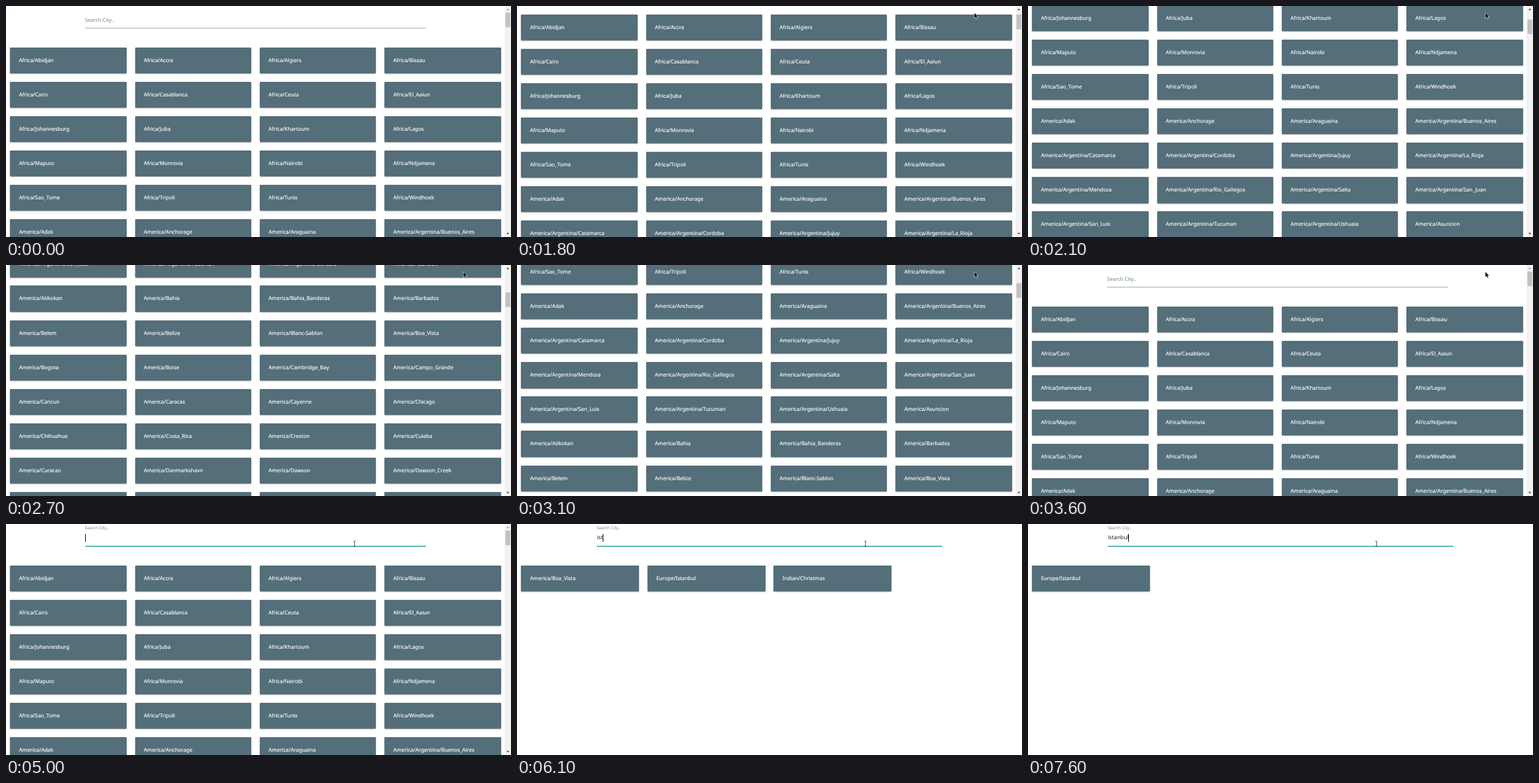
Write an HTML page that moves like this. It is 766x350 px and loops after 8 s.

```html
<!DOCTYPE html>
<html lang="en">
<head>
<meta charset="utf-8">
<title>City search</title>
<style>
html, body { margin: 0; width: 100%; height: 100%; overflow: hidden; background: #fff; }
#stage {
  position: relative; width: 766px; height: 350px; overflow: hidden; background: #fff;
  font-family: "Noto Sans", "Open Sans", sans-serif; text-rendering: geometricPrecision;
}
#page { position: absolute; left: 0; top: 0; width: 757px; }
#page.wide { width: 766px; }
#field { position: absolute; left: calc(15% + 6.3px); width: calc(70% - 12.6px); top: 0; height: 40px; }
#field * { position: absolute; left: 0; white-space: pre; }
#label { top: 11.5px; line-height: 20px; font-size: 7.8px; color: #6b8390; transform-origin: 0 50%; }
#line { top: 33px; width: 100%; height: 1px; background: #a5adb0; }
#focus { top: 33px; width: 100%; height: 1px; background: #26a69a; box-shadow: 0 1px rgba(38, 166, 154, .45); }
#text { top: 11.3px; line-height: 20px; font-size: 8.3px; color: #1c1c1c; }
#caret { top: 15px; width: 1px; height: 12px; background: #111; }
#grid {
  position: absolute; top: 62.9px; width: 100%; box-sizing: border-box; padding: 0 6.3px;
  display: grid; grid-template-columns: repeat(4, minmax(0, 1fr)); grid-auto-rows: 39.2px; gap: 12.88px 12.6px;
}
.card {
  padding-left: 13.5px; line-height: 41px; font-size: 7.92px; color: #fff; white-space: nowrap;
  -webkit-text-stroke: .15px #fff; background: #546e7a; border-radius: 1.1px;
  box-shadow: 0 1.1px 1.1px rgba(0, 0, 0, .14), 0 1.7px .6px -1.1px rgba(0, 0, 0, .12), 0 .6px 2.8px rgba(0, 0, 0, .2);
}
svg { position: absolute; left: 0; top: 0; }
</style>
</head>
<body>
<div id="stage">
  <div id="page">
    <div id="field">
      <div id="label">Search City..</div>
      <div id="line"></div>
      <div id="focus"></div>
      <div id="text"></div>
      <div id="caret"></div>
    </div>
    <div id="grid"></div>
  </div>
  <svg width="766" height="350">
    <g id="bar">
      <rect x="756.5" width="9.5" height="350" fill="#f1f1f1"/>
      <rect id="thumb" x="757.5" y="10" width="7.5" height="22" fill="#c1c1c1"/>
      <path id="up" d="M759 6.2l2.2-2.4 2.2 2.4z"/>
      <path d="M759 343.8l2.2 2.4 2.2-2.4z" fill="#505050"/>
    </g>
    <path id="arrow" d="M0 0v8.8l2-1.9 1.5 3.2 1.5-.7-1.4-3.1h2.7z" fill="#000" stroke="#fff" stroke-width=".6"/>
    <path id="beam" d="M-1.8-4h1.3l.5.5.5-.5h1.3M0-3.5v7M-1.8 4h1.3l.5-.5.5.5h1.3" fill="none" stroke="#333" stroke-width=".8"/>
  </svg>
</div>
<script>
const LOOP = 8000, TICK = 100;
const zones = {
  "Africa": "Abidjan Accra Algiers Bissau Cairo Casablanca Ceuta El_Aaiun Johannesburg Juba Khartoum Lagos " +
    "Maputo Monrovia Nairobi Ndjamena Sao_Tome Tripoli Tunis Windhoek",
  "America": "Adak Anchorage Araguaina Argentina/Buenos_Aires Argentina/Catamarca Argentina/Cordoba " +
    "Argentina/Jujuy Argentina/La_Rioja Argentina/Mendoza Argentina/Rio_Gallegos Argentina/Salta " +
    "Argentina/San_Juan Argentina/San_Luis Argentina/Tucuman Argentina/Ushuaia Asuncion Atikokan Bahia " +
    "Bahia_Banderas Barbados Belem Belize Blanc-Sablon Boa_Vista Bogota Boise Cambridge_Bay Campo_Grande " +
    "Cancun Caracas Cayenne Chicago Chihuahua Costa_Rica Creston Cuiaba Curacao Danmarkshavn Dawson " +
    "Dawson_Creek Denver Detroit Edmonton Eirunepe Indiana/Indianapolis Kentucky/Louisville",
  "Antarctica": "Davis",
  "Asia": "Bishkek Tbilisi",
  "Australia": "Brisbane",
  "Europe": "Chisinau Istanbul Lisbon Paris",
  "Indian": "Christmas"
};
// [time, value] pairs, linear between
const scrollKeys = [[1700, 0], [2000, 150], [2100, 168], [2200, 168], [2700, 500], [2800, 485],
  [3100, 280], [3200, 168], [3300, 168], [3600, 0]];
const focusKeys = [[4700, 0], [5000, 1]];
const moveKeys = [[4100, 0], [4600, 1]];
const word = "istanbul";
const typedAt = [5700, 5900, 6100, 6300, 6500, 6700, 6900, 7600];

const $ = id => document.getElementById(id);
const show = (el, on) => { el.style.visibility = on ? "visible" : "hidden"; };

const cards = Object.entries(zones).flatMap(([area, list]) => list.split(" ").map(city => {
  const el = document.createElement("div");
  el.className = "card";
  el.textContent = area + "/" + city;
  $("grid").append(el);
  return { el, key: el.textContent.toLowerCase() };
}));

function at(keys, t) {
  if (t <= keys[0][0]) return keys[0][1];
  for (let i = 1; i < keys.length; i++) {
    const [t0, a] = keys[i - 1], [t1, b] = keys[i];
    if (t <= t1) return a + (b - a) * (t - t0) / (t1 - t0);
  }
  return keys[keys.length - 1][1];
}

let query = null;
function search(q) {
  if (q === query) return;
  query = q;
  let count = 0;
  for (const { el, key } of cards) {
    const hit = key.includes(q);
    el.style.display = hit ? "" : "none";
    count += hit;
  }
  const fits = count <= 20;
  $("page").classList.toggle("wide", fits);
  show($("bar"), !fits);
  $("text").textContent = q;
  $("caret").style.left = $("text").getBoundingClientRect().width + "px";
}

function draw(t) {
  search(word.slice(0, typedAt.filter(k => k <= t).length));

  const y = at(scrollKeys, t);
  $("page").style.transform = `translateY(${-y}px)`;
  $("thumb").setAttribute("y", 10 + y * 0.063);
  $("up").setAttribute("fill", y > 0 ? "#505050" : "#a3a3a3");

  const f = at(focusKeys, t), e = 1 - (1 - f) ** 2;
  $("label").style.transform = `translateY(${-15.5 * e}px) scale(${1 - 0.19 * e})`;
  $("focus").style.opacity = f;
  const blink = (t >= 5300 && t < 5700) || (t >= 7500 && t < 7600);
  show($("caret"), t >= 4800 && !blink);

  const m = at(moveKeys, t), s = m * m * (3 - 2 * m);
  const mx = 693.5 - 165 * s, my = 10 + 20 * s;
  const inField = mx < 636 && my > 9;
  for (const id of ["arrow", "beam"]) {
    $(id).setAttribute("transform", `translate(${mx} ${my})`);
    show($(id), t >= 1800 && inField === (id === "beam"));
  }
}

const start = performance.now();
function loop() {
  const t = (performance.now() - start) % LOOP;
  draw(Math.floor(t / TICK) * TICK);
  requestAnimationFrame(loop);
}
loop();
</script>
</body>
</html>
```
